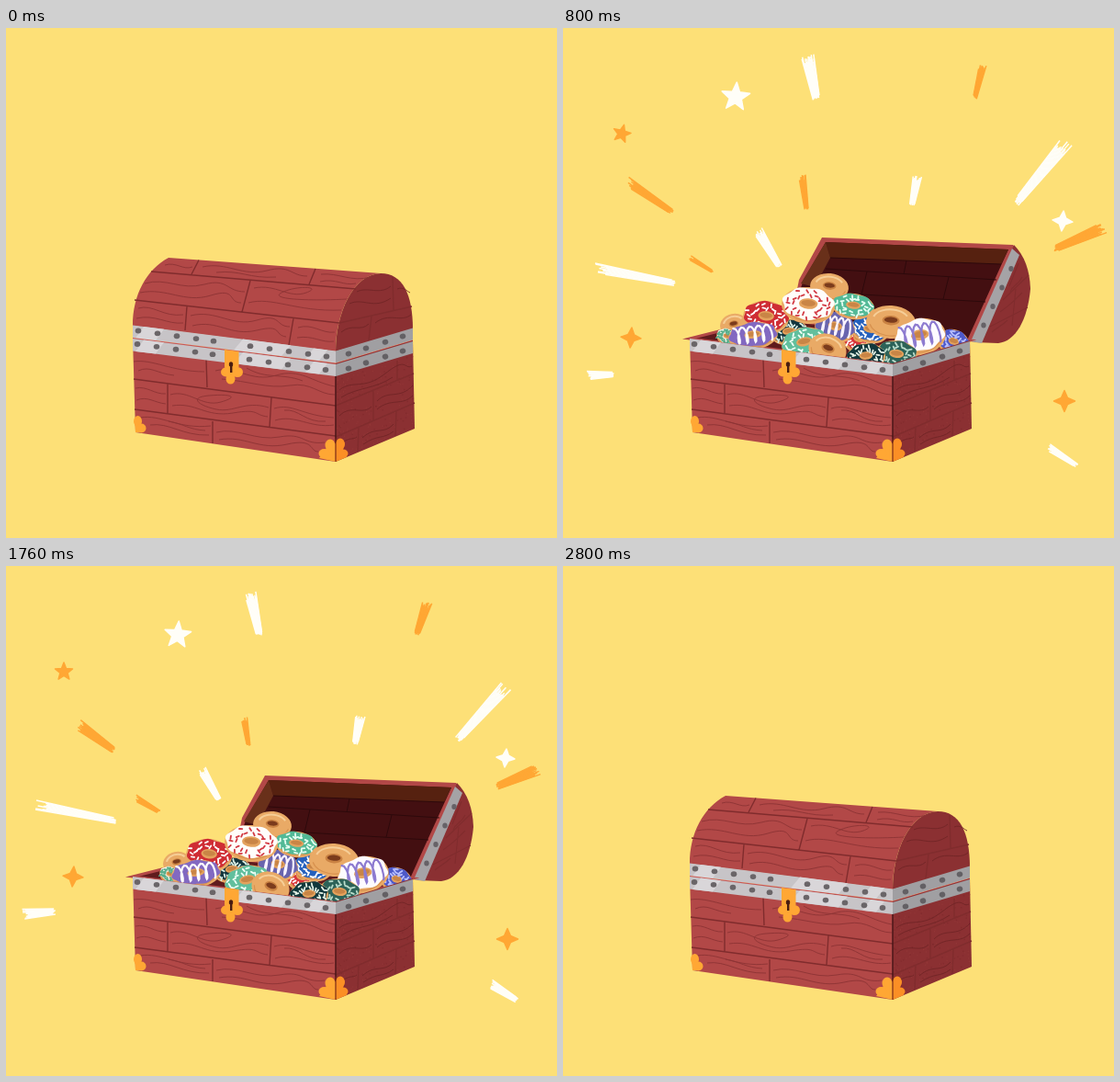
Animation of 600x555 px, one loop 2880 ms. Source, as an HTML page with a canvas:

```html
<!DOCTYPE html>
<html lang="en">
<head>
<meta charset="utf-8">
<title>Treasure chest of donuts</title>
<style>
html, body { margin: 0; width: 100%; height: 100%; overflow: hidden; background: #fde077; }
canvas { display: block; }
</style>
</head>
<body>
<canvas id="stage" width="600" height="555"></canvas>
<script>
const c = document.getElementById('stage').getContext('2d');
const RED = '#b24847', DARK = '#8b3032', SEAM = '#802c2d', ORANGE = '#ffa734', TAN = '#e9aa66';
const STEP = 80, FRAMES = 36;

function shape(d, fill, stroke, width = 1) {
  const p = new Path2D(d);
  if (fill) { c.fillStyle = fill; c.fill(p); }
  if (stroke) { c.strokeStyle = stroke; c.lineWidth = width; c.stroke(p); }
}
function oval(x, y, rx, ry, fill, rot = 0) {
  c.beginPath();
  c.ellipse(x, y, rx, ry, rot, 0, 7);
  c.fillStyle = fill;
  c.fill();
}
function line(x1, y1, x2, y2, color, width) {
  c.beginPath();
  c.moveTo(x1, y1);
  c.lineTo(x2, y2);
  c.strokeStyle = color;
  c.lineWidth = width;
  c.stroke();
}
function random(seed) {
  return () => (seed = (seed * 16807) % 2147483647) / 2147483647;
}
function group(draw, dx = 0, dy = 0, sx = 1, sy = 1, ox = 0, oy = 0) {
  c.save();
  c.translate(ox + dx, oy + dy);
  c.scale(sx, sy);
  c.translate(-ox, -oy);
  draw();
  c.restore();
}

// ---- chest ----
const FRONT_X = [143, 164, 185, 206, 225, 265, 286, 307, 328, 348];
const SIDE_X = [373, 392, 413, 432];

function rivets(up) {
  for (const x of FRONT_X) oval(x + (up ? 1 : 0), 344 + (x - 143) * .1366 - up, 3.3, 2.9, '#6a6568');
  for (const x of SIDE_X) oval(x, 370.5 - (x - 373) * .322 - up * 1.1, 3.3, 2.9, '#636064', -.3);
}
function bands(up) {
  group(() => {
    shape('M138 338L359 366V379L138 351.500Z', '#c7c4c7');
    shape('M150 339.500L172 342.300L163 354.500L141 352ZM258 353L310 359.800L300 371.500L248 365ZM335 363L350 365L341 376.500L326 374.700Z', '#d9d6d9');
    shape('M359 366L443 341V354L359 379Z', '#a09fa2');
  }, 0, -up);
  rivets(up);
}

function corners() {
  shape('M359 472L341 468L349 457L359 452Z', ORANGE);
  oval(353, 454, 5.5, 6.5, ORANGE);
  oval(346.500, 463, 6, 5, ORANGE);
  shape('M359 472L371 467L366 456L359 451Z', '#fb8f25');
  oval(364, 453, 5, 6.500, '#fb8f25');
  oval(367, 463, 5.500, 4.500, '#fb8f25');
  line(359, 447, 359, 472, '#7b2b16', 1.2);
  shape('M140 423L148 440L141 440Z', ORANGE);
  oval(143.500, 428, 4.500, 6, ORANGE);
  oval(147.500, 435.500, 5, 5, ORANGE);
}

function lock() {
  shape('M238 350L253.500 352V369L249 379H242L238 369Z', ORANGE);
  oval(239.500, 374.500, 5.500, 5, ORANGE);
  oval(252, 374.500, 6, 5.500, ORANGE);
  oval(244.500, 382, 5, 5.500, ORANGE);
  oval(245, 366, 2.200, 2.800, '#4a1d10');
  shape('M244 366H246.400V375H244Z', '#4a1d10');
}

function base() {
  shape('M138 338L359 365V472L141 440Z', RED);
  shape('M359 365L443 340L445 436L359 472Z', DARK);
  const r = random(41);
  for (let i = 0; i < 230; i++) {
    const u = r() ** 1.4, v = r();
    c.fillStyle = i % 3 ? '#a0424055' : '#70232455';
    c.fillRect(360 + u * 83, 380 - u * 25 + v * (90 - u * 12), 1.300, 1.300);
  }
  shape('M139 382L359 411M140 415L359 444M218 361L219 391M176 387V420M289 402L287 434M225 428V452' +
    'M359 411L444 376M359 445L445 408M400 395V428M426 362V383M384 434L383 461M425 417L424 444', null, SEAM, 1.4);
  shape('M139 363C160 360 180 374 216 374M144 373C157 367 164 376 183 378M228 373C250 367 267 386 294 378S332 385 358 390' +
    'M235 382C264 384 285 393 309 389S340 399 358 399M262 370C284 383 300 375 323 384' +
    'M141 392C153 389 162 399 174 398M142 405C154 400 162 408 174 409' +
    'M179 399C199 393 213 413 234 407S244 398 221 400S210 411 229 415S260 405 286 413M181 411C207 407 217 424 247 419S269 421 285 423' +
    'M292 414C312 408 323 422 357 424M293 427C315 420 331 436 357 432M303 416C319 414 326 430 348 428' +
    'M146 424C169 420 187 437 223 433M157 432C178 429 192 444 221 443M177 428C194 431 199 437 217 438' +
    'M229 440C252 434 271 450 298 445S323 454 347 451M232 448C260 443 275 460 306 453S330 461 340 461', null, '#8d3435', .9);
  shape('M363 394C378 382 389 395 413 376S433 372 442 368M365 402C382 391 402 393 421 380M363 422C376 409 388 422 398 412' +
    'M404 406C417 393 428 405 443 389M404 415C419 402 431 412 443 400M364 454C373 444 377 449 382 445M388 446C402 433 411 443 422 431M389 453C405 442 410 448 422 439', null, '#712526', .9);
  line(359, 378, 359, 472, '#4a1618', 1.5);
  bands(0);
  corners();
  lock();
}

function closedLid() {
  shape('M138 324C138 290 153 263 177 250L408 267C378 268 359 310 359 352Z', RED);
  shape('M359 352C359 310 378 268 408 267C432 267 443 290 443 328Z', DARK);
  shape('M158 265L381 284M140 296L363 321M210 252.500L202 268M337 262L330 279M266 275L257 309M197 303L195 329M313 316L308 345' +
    'M363 321L442 303M421 271L422 307M398 314L395 340', null, SEAM, 1.4);
  shape('M173 258C185 254 193 264 203 260M214 260C240 254 258 271 284 264S310 270 328 270M229 266C255 263 265 273 294 271' +
    'M343 268C362 266 376 277 397 271M342 276C360 272 367 281 381 278' +
    'M151 278C175 271 190 286 216 279S240 287 260 287M146 288C175 282 194 300 223 291S241 299 256 299' +
    'M270 283C294 278 308 295 327 288S315 280 300 288S337 297 371 295M264 299C290 292 315 309 365 307' +
    'M144 305C160 300 171 315 193 312M142 316C162 311 176 323 193 321M201 313C229 306 246 326 273 318S293 325 309 325' +
    'M203 324C231 317 244 336 273 329S291 334 305 336M318 326C334 321 344 333 358 331M317 337C334 334 344 343 357 341', null, '#8d3435', .9);
  shape('M374 300C389 293 400 307 419 294M382 287C394 281 407 291 419 281M426 284C433 281 437 287 440 288M365 331C377 321 386 331 395 322M402 321C417 309 430 321 441 312', null, '#712526', .9);
  bands(14.500);
  shape('M138 337L359 364.500L443 339.500V343L359 367L138 339Z', '#cf5a5c');
}

function openLid() {
  shape('M282 228L490 236L497 246L450 342L250 310L257 274Z', RED);
  shape('M286 233L485 241L440 340L248 315L262 274Z', '#430f11');
  shape('M286 233L485 241L477 257L291 250Z', '#562110');
  shape('M286 233L291 250L274 282L259 278Z', '#69301a');
  shape('M291 250L477 257M286 262L472 274M276 287L460 298M374 253L371 268M420 271L414 295M331 265L325 290', null, '#2d090b', 1);
  shape('M491 236Q508 253 509 284C506 317 493 341 474 343L448 342Z', DARK);
  shape('M507 269L479 296M506 304L465 325M496 256L486 281M493 284L489 324M500 288C488 300 488 300 476 309M500 271C495 281 489 280 487 287M484 318C477 325 472 326 467 331', null, SEAM, 1.1);
  shape('M489 240L497 247L456 343L444 341Z', '#a5a3a6');
  for (let i = 0; i < 4; i++) oval(488 - i * 10, 262 + i * 20.500, 2.700, 2.900, '#666267');
}

// ---- donuts ----
function donut(x, y, rx, ry, rot, icing, trim, trimColor) {
  c.save();
  c.translate(x, y);
  c.rotate(rot);
  oval(0, 0, rx, ry, TAN);
  c.beginPath();
  c.ellipse(0, 0, rx * .86, ry * .84, 0, .2, 2.900);
  c.strokeStyle = '#d8924f';
  c.lineWidth = 1.200;
  c.stroke();
  if (icing) {
    c.beginPath();
    for (let a = 0; a < 6.300; a += .1) {
      const k = .96 + .045 * Math.sin(a * 7 + x);
      c.lineTo(Math.cos(a) * rx * k, Math.sin(a) * ry * k * .9 - ry * .1);
    }
    c.fillStyle = icing;
    c.fill();
  } else {
    c.beginPath();
    c.ellipse(0, -ry * .1, rx * .73, ry * .66, 0, 3.400, 5.800);
    c.strokeStyle = '#f6ce97';
    c.lineWidth = 2;
    c.stroke();
  }
  oval(0, -ry * .1, rx * .35, ry * .29, icing ? '#e4a25d' : '#c98243');
  oval(0, -ry * .13, rx * .27, ry * .17, icing ? '#c98546' : '#7b3b1c');
  c.lineCap = 'round';
  if (trim === 'sprinkles') {
    const r = random(Math.round(x * 31 + y));
    for (let i = 0; i < 30; i++) {
      const a = i * 2.400, k = i % 2 ? .82 : .55, b = r() * 3.140;
      const px = Math.cos(a) * rx * k, py = Math.sin(a) * ry * k * .9 - ry * .1;
      line(px, py, px + Math.cos(b) * 3.300, py + Math.sin(b) * 3.300, trimColor, 1.800);
    }
  }
  if (trim === 'drizzle') {
    c.beginPath();
    for (let u = -.75; u <= .76; u += .03) {
      c.lineTo(rx * (u + .1 * Math.cos(u * 19)), ry * (Math.sin(u * 19) * .58 - .12));
    }
    c.strokeStyle = trimColor;
    c.lineWidth = 2.200;
    c.stroke();
  }
  c.restore();
}

const PILE = [
  [290, 282, 21, 15, .1],
  [186, 323, 15, 12, -.2],
  [178, 336, 11, 9, .3, '#f6f4ea', 'sprinkles', '#58ae8b'],
  [425, 342, 17, 14, .3, '#4d59c9', 'sprinkles', '#b9c0ff'],
  [246, 331, 20, 14, -.2, '#12353d', 'sprinkles', '#d9efe5'],
  [322, 339, 18, 15, .2, '#d83439', 'sprinkles', '#fff'],
  [334, 329, 21, 14, .2, '#2460bd', 'sprinkles', '#fff'],
  [296, 326, 22, 17, .2, '#6964ae', 'drizzle', '#f8f2ff'],
  [221, 315, 25, 18, .1, '#cf2d34', 'sprinkles', '#fff'],
  [316, 303, 23, 14, .12, '#52b996', 'sprinkles', '#e6fff2'],
  [267, 302, 29, 20, .08, '#fffdfa', 'sprinkles', '#d23a44'],
  [207, 335, 27, 15, -.12, '#8269c1', 'drizzle', '#fff'],
  [263, 343, 25, 17, -.2, '#61bf9d', 'sprinkles', '#effff6'],
  [357, 320, 27, 18, .06],
  [389, 336, 28, 20, -.18, '#fdfbff', 'drizzle', '#8d7bd0'],
  [363, 356, 23, 16, .1, '#2c6258', 'sprinkles', '#b9dccb'],
  [330, 358, 21, 15, -.08, '#12383c', 'sprinkles', '#e5f2e7'],
  [288, 350, 21, 17, .35]
];

function cavity() {
  shape('M138 338L225 316L443 340L359 366Z', '#5f1b1d', RED, 3);
}

// ---- sparkle burst: outer point, inner point, outer width ----
const WHITE_A = [[266, 30, 276, 78, 14], [549, 123, 493, 191, 14], [34, 261, 124, 278, 10], [212, 220, 236, 260, 10], [386, 161, 380, 193, 9], [26, 378, 56, 377, 9], [528, 456, 560, 477, 8]];
const WHITE_B = [[266, 29, 276, 76, 12], [545, 130, 491, 190, 13], [32, 260, 123, 278, 10], [213, 221, 232, 255, 9], [386, 163, 380, 194, 10], [18, 379, 54, 376, 11], [527, 454, 557, 473, 9]];
const ORANGE_A = [[457, 40, 448, 77, 8], [69, 166, 120, 201, 9], [260, 160, 265, 198, 8], [138, 250, 164, 266, 5], [590, 217, 534, 241, 12]];
const ORANGE_B = [[459, 39, 447, 75, 10], [78, 172, 118, 201, 11], [259, 165, 264, 196, 7], [140, 252, 167, 268, 7], [580, 221, 534, 240, 12]];

function ray([x1, y1, x2, y2, w], color) {
  const r = random(x1 * 7 + y1), len = Math.hypot(x2 - x1, y2 - y1);
  const nx = (y1 - y2) / len, ny = (x2 - x1) / len;
  c.lineCap = 'butt';
  for (let s = -w / 2; s <= w / 2; s += .9) {
    const a = r() * .16, b = 1 - r() * .1;
    line(x1 + (x2 - x1) * a + nx * s, y1 + (y2 - y1) * a + ny * s,
      x1 + (x2 - x1) * b + nx * s * .55, y1 + (y2 - y1) * b + ny * s * .55, color, 1.500);
  }
}
function star(x, y, r, points, color, tilt = 0) {
  c.beginPath();
  for (let i = 0; i < points * 2; i++) {
    const a = tilt - Math.PI / 2 + i * Math.PI / points, k = i % 2 ? r * .43 : r;
    c.lineTo(x + Math.cos(a) * k, y + Math.sin(a) * k);
  }
  c.closePath();
  c.fillStyle = c.strokeStyle = color;
  c.lineJoin = 'round';
  c.lineWidth = 1.500;
  c.fill();
  c.stroke();
}
function burst(alt) {
  for (const s of alt ? WHITE_B : WHITE_A) ray(s, '#fffef8');
  for (const s of alt ? ORANGE_B : ORANGE_A) ray(s, ORANGE);
  const d = alt ? 1 : 0;
  star(188 - d, 75, 16 - d, 5, '#fffef8', .08);
  star(64 - d, 115, 10, 5, ORANGE, alt ? 0 : .25);
  star(544, 210 - d, 11 - d, 4, '#fffef8', .1);
  star(74 - d, 337 + d, 11, 4, ORANGE, .08);
  star(546, 406, 11.500, 4, ORANGE);
}

// [first step, lid opening, chest height, donut shift, chest shift, burst size]
const KEYS = [
  [0, 0, 1, 0, 0, 0], [1, 0, .84, 0, 0, 0], [3, .55, 1, 0, -2, 0],
  [4, 1, 1, -13, -6, .8], [5, 1, 1, -12, -5, 1], [6, 1, 1, -9, -4, 1],
  [7, 1, 1, -5, -2, 1], [8, 1, 1, -2, -1, 1], [9, 1, 1, 0, 0, 1],
  [23, 1, 1, 0, 0, .8], [24, 1, 1, 4, 0, 0], [25, .55, 1, 9, 0, 0],
  [26, 0, .92, 0, 0, 0], [27, 0, .84, 0, 0, 0], [29, 0, .94, 0, 0, 0], [30, 0, 1, 0, 0, 0]
];

function render(now) {
  const step = Math.floor(now / STEP) % FRAMES;
  const [, open, height, pop, lift, spread] = KEYS.filter(k => k[0] <= step).pop();
  c.fillStyle = '#fde077';
  c.fillRect(0, 0, 600, 555);
  if (spread) group(() => burst((step * STEP + 40) % 400 >= 200), 0, 0, spread, spread, 300, 300);
  if (open) {
    group(openLid, 0, 0, 1, open, 450, 342);
    group(cavity, 0, lift);
    group(() => PILE.forEach(d => donut(...d)), 0, pop);
    group(base, 0, lift);
  } else {
    group(() => {
      group(closedLid, 0, height < .9 ? 2 : 0);
      base();
    }, 0, 0, 1, height, 0, 472);
  }
  requestAnimationFrame(() => render(performance.now() - start));
}
const start = performance.now();
render(0);
</script>
</body>
</html>
```
